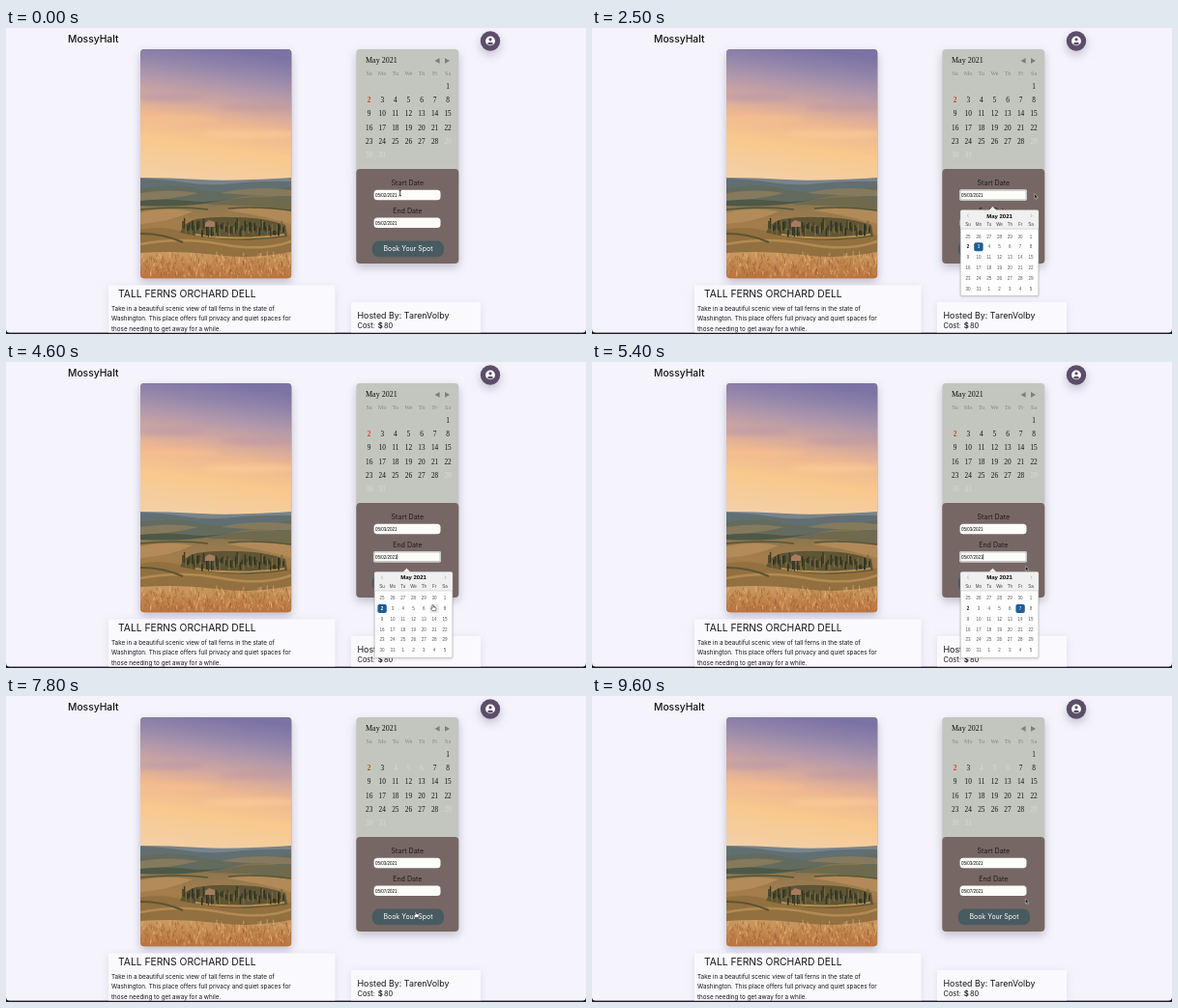
These frames come from a looping animation (600x317 px, 9700 ms). An HTML page:

```html
<!DOCTYPE html>
<html lang="en">
<head>
<meta charset="utf-8">
<title>Booking page</title>
<style>
html, body { margin: 0; width: 100%; height: 100%; overflow: hidden; background: #1c1c1e; }
svg { display: block; width: 600px; height: 317px; }
text { font-family: Inter, "Open Sans", sans-serif; white-space: pre; }
.mid { text-anchor: middle; }
.serif text { font-family: "Liberation Serif", serif; }
.sans, .sans text { font-family: "Liberation Sans", sans-serif; }
.soft { filter: drop-shadow(0 4px 5px rgba(40, 35, 60, .26)); }
.faint { filter: drop-shadow(0 2px 4px rgba(70, 65, 100, .13)); }
.haze { filter: blur(2.5px); opacity: .55; }
</style>
</head>
<body>
<svg viewBox="0 0 600 317" xmlns="http://www.w3.org/2000/svg">
  <defs>
    <linearGradient id="sky" x1=".58" y1="0" x2=".42" y2="1">
      <stop offset="0" stop-color="#7b73a4"/>
      <stop offset=".14" stop-color="#9285aa"/>
      <stop offset=".27" stop-color="#b097ab"/>
      <stop offset=".4" stop-color="#cfa6a0"/>
      <stop offset=".54" stop-color="#edb791"/>
      <stop offset=".72" stop-color="#f8c88d"/>
      <stop offset="1" stop-color="#f3d0a6"/>
    </linearGradient>
    <linearGradient id="field" x1="0" y1="0" x2="0" y2="1">
      <stop offset="0" stop-color="#7f7350"/>
      <stop offset=".45" stop-color="#a57d4c"/>
      <stop offset="1" stop-color="#94703f"/>
    </linearGradient>
    <linearGradient id="wheat" x1="0" y1="0" x2="0" y2="1">
      <stop offset="0" stop-color="#c99a62"/>
      <stop offset="1" stop-color="#b9713c"/>
    </linearGradient>
    <clipPath id="frame"><rect x="139" y="22" width="156.3" height="237.3" rx="4"/></clipPath>
  </defs>

  <rect y="-10" width="600" height="325.800" rx="4" fill="#f5f4fd"/>
  <text x="64" y="14.6" font-size="10.300" font-weight="500" fill="#111">MossyHalt</text>

  <circle class="soft" cx="501" cy="13.5" r="10.2" fill="#5c4e69"/>
  <circle cx="501" cy="13.4" r="4.9" fill="#fff"/>
  <circle cx="501" cy="11.8" r="1.6" fill="#5c4e69"/>
  <path d="M497.8 15.9q3.2-2.5 6.4 0q-3.2 3.3-6.4 0z" fill="#5c4e69"/>

  <rect class="soft" x="139" y="22" width="156.3" height="237.3" rx="4" fill="#b58b58"/>
  <g clip-path="url(#frame)">
    <rect x="139" y="22" width="157" height="140" fill="url(#sky)"/>
    <g class="haze">
      <ellipse cx="168" cy="72" rx="38" ry="4" fill="#b596aa"/>
      <ellipse cx="262" cy="82" rx="42" ry="4" fill="#bd98a0"/>
      <ellipse cx="176" cy="94" rx="46" ry="4" fill="#f8c28d"/>
      <ellipse cx="254" cy="110" rx="50" ry="4" fill="#fbd29a"/>
    </g>
    <path d="M139 155q30 0 62 2t94-2v30H139z" fill="#78838b"/>
    <path d="M139 156q22 0 46 4t50 1 60-2v35H139z" fill="#626f72"/>
    <path d="M139 166q34-6 62 1t94-3v40H139z" fill="#636b5f"/>
    <path d="M139 171q30-5 60 0-28 7-60 8zM222 171q36-8 73-3v6q-40 0-73-3z" fill="#857a5e"/>
    <path d="M139 183q22-6 46-2t50-4 60 1v60H139z" fill="url(#field)"/>
    <path d="M139 179q24-3 50 0t48-4q-38 12-98 9z" fill="#4d5847"/>
    <path d="M208 183q40-11 87-7v12q-46-5-87-5z" fill="#6f694e"/>
    <path d="M139 191q26-6 54-1-24 11-54 13z" fill="#b38b58"/>
    <path d="M228 189q34-5 67 1v13q-34-10-67-14z" fill="#b18a58"/>
    <path d="M139 188q40-4 70 0M230 187q30-3 65 2" fill="none" stroke="#555439" stroke-width="1.500"/>
    <path d="M139 209q22-5 46 3 54 8 110 2v24H139z" fill="#92703f"/>
    <path d="M139 224q42-8 84 0t72-3" fill="none" stroke="#b28b52" stroke-width="2.500"/>
    <path d="M139 213q24 0 44 9" fill="none" stroke="#5d5335" stroke-width="2"/>
    <path d="M180 212q4-11 17-14 20-3 38-2 30 0 54 8l2 12q-56 9-111-4z" fill="#5f5535"/>
    <path d="M196 214q44 7 92 0" fill="none" stroke="#b98e50" stroke-width="1.800"/>
    <g id="trees" stroke-linecap="round"/>
    <path d="M206 202l4-3 6 2v5h-10z" fill="#a67c5c"/>
    <path d="M139 233q40-3 78 2t78-3v28H139z" fill="url(#wheat)"/>
    <g id="straw" fill="none" stroke-width=".7"/>
  </g>

  <g class="soft">
    <rect x="362.300" y="22" width="106" height="222" rx="4" fill="#c3c6bf"/>
    <rect x="362.300" y="146" width="106" height="98" rx="4" fill="#766764"/>
  </g>
  <g class="serif" id="month">
    <text x="372" y="36" font-size="8" fill="#111">May 2021</text>
    <path d="M448.600 31v5.800l-5-2.900zM454 31v5.800l5-2.900z" fill="#7d7f7b"/>
  </g>

  <g class="mid" font-size="7.1" fill="#211b1b">
    <text x="415.3" y="163">Start Date</text>
    <text x="415.3" y="191.700">End Date</text>
  </g>
  <g id="inputs" class="sans"></g>
  <rect x="378.800" y="220.600" width="74.200" height="16.600" rx="7" fill="#475b60"/>
  <text class="mid" x="416" y="231.400" font-size="7" fill="#fff">Book Your Spot</text>

  <rect class="faint" x="106" y="266.500" width="234.500" height="49.300" fill="#f9f9fe"/>
  <rect class="faint" x="357" y="284" width="134" height="31.800" fill="#f9f9fe"/>
  <g fill="#161616">
    <text x="116" y="279.300" font-size="10.300">TALL FERNS ORCHARD DELL</text>
    <g font-size="6.300">
      <text x="109" y="292.500">Take in a beautiful scenic view of tall ferns in the state of</text>
      <text x="109" y="303.200">Washington. This place offers full privacy and quiet spaces for</text>
      <text x="109" y="313.900">those needing to get away for a while.</text>
    </g>
    <text x="363.500" y="300.700" font-size="8.900">Hosted By: TarenVolby</text>
    <text x="363.500" y="311" font-size="7.400">Cost:</text>
    <text x="384.800" y="311" font-size="7.800" font-weight="600">$</text>
    <text x="391" y="311" font-size="7.400">80</text>
  </g>
  <rect y="315.800" width="600" height="1.200" fill="#1c1c1e"/>

  <g id="picker" class="sans"></g>

  <g id="cursor">
    <path id="beam" d="M-1.300-3q1.300 0 1.300 1v4q0 1-1.300 1M1.300-3Q0-3 0-2M1.300 3Q0 3 0 2" fill="none" stroke="#111" stroke-width=".8"/>
    <path id="arrow" d="M0 0v5l1.200-1 .8 1.900.9-.4-.8-1.800h1.600z" fill="#111" stroke="#fff" stroke-width=".4"/>
    <path id="hand" d="M-.6.300q.6-.7 1.200 0v2l2.300.6q.7.300.5 1.200l-.5 2H-.6L-2.200 3.700q.2-.9 1.600 0z" fill="#fff" stroke="#222" stroke-width=".55"/>
  </g>
</svg>
<script>
const LOOP = 9700, STEP = 100;
const WEEK = ['Su', 'Mo', 'Tu', 'We', 'Th', 'Fr', 'Sa'];
const $ = id => document.getElementById(id);
const add = (id, markup) => $(id).insertAdjacentHTML('beforeend', markup);
const label = (x, y, size, fill, str, extra = '') =>
  `<text class="mid" x="${x}" y="${y}" font-size="${size}" fill="${fill}" ${extra}>${str}</text>`;

let seed = 11;
const rand = () => (seed = seed * 16807 % 2147483647) / 2147483647;

function drawPhoto() {
  const leaves = ['#2f3323', '#3a3d28', '#7b6a3d'];
  for (let i = 0; i < 64; i++) {
    const x = 183 + i * 1.65, y = 207 + rand() * 9;
    const h = 3 + rand() * 8;
    add('trees', `<path d="M${x} ${y}v${-h}" stroke="${leaves[i % 3]}" stroke-width="${1 + rand()}"/>`);
  }
  const tones = ['#ecc58d', '#a4602f', '#dd9d5e', '#8c562c'];
  tones.forEach(tone => {
    let d = '';
    for (let i = 0; i < 85; i++)
      d += `M${139 + rand() * 156} ${236 + rand() * 23}l${rand() * 3 - 1.5} ${-2 - rand() * 4}`;
    add('straw', `<path d="${d}" stroke="${tone}" opacity=".75"/>`);
  });
}

function drawMonth() {
  const x = col => 375.7 + col * 13.57;
  WEEK.forEach((w, i) => add('month', label(x(i), 49, 6, '#858782', w)));
  for (let day = 1; day <= 31; day++) {
    const cell = day + 5, row = Math.floor(cell / 7);
    const fill = day === 2 ? '#d0441a' : day > 28 ? '#d7d9d3' : '#111';
    add('month', label(x(cell % 7), 62.6 + row * 14.35, 7.3, fill, day,
      `id="day${day}"${day === 2 ? ' font-weight="bold"' : ''}`));
  }
}

function drawInputs() {
  [167.8, 196.6].forEach((y, i) => add('inputs',
    `<rect id="box${i}" x="380.600" y="${y}" width="68.900" height="10.500" fill="#fcfdf9"/>
     <rect id="ring${i}" x="380.900" y="${y + .3}" width="68.300" height="9.900" rx=".8" fill="none" stroke="#5b6566" stroke-width=".5"/>
     <text id="date${i}" x="382" y="${y + 7}" font-size="4.500" fill="#000"></text>
     <path id="caret${i}" d="M404.700 ${y + 2.6}v5.400" stroke="#000" stroke-width=".6"/>`));
}

const CELL = 10.8, COL0 = 389.1, ROW0 = 215.9;

function drawPicker() {
  add('picker', `<g filter="drop-shadow(0 1px 1px rgba(0,0,0,.15))">
    <rect x="381.200" y="188.600" width="80.700" height="89" rx="1.500" fill="#fff" stroke="#aeaeae" stroke-width=".6"/></g>
    <path d="M381.500 208V190q0-1.100 1.100-1.100h77.900q1.100 0 1.100 1.100v18z" fill="#f0f0f0"/>
    <path d="M381.400 208.200h80.300" stroke="#b4b4b4" stroke-width=".5"/>
    <path d="M410.500 188.900l4-4 4 4z" fill="#f0f0f0"/>
    <path d="M389.700 192.700l-1.400 1.700 1.400 1.700M453.700 192.700l1.400 1.700-1.400 1.700" fill="none" stroke="#aaa" stroke-width=".7"/>
    <rect id="hover" width="9.400" height="9" rx="2" fill="#e9e9e9"/>
    <rect id="pick" width="9.400" height="9" rx="2" fill="#205d96"/>`);
  add('picker', label(421.5, 196.7, 6, '#000', 'May 2021', 'font-weight="bold"'));
  WEEK.forEach((w, i) => add('picker', label(COL0 + i * CELL, 205.3, 4.5, '#444', w)));
  for (let cell = 0; cell < 42; cell++) {
    const n = cell - 5;
    const day = n < 1 ? n + 30 : n > 31 ? n - 31 : n;
    add('picker', label(COL0 + cell % 7 * CELL, ROW0 + Math.floor(cell / 7) * CELL + 1.6,
      4.5, '#555', day, `id="cell${cell}"${n === 2 ? ' font-weight="bold"' : ''}`));
  }
}

// Pointer path: start, end, target x, target y
const START = [407.7, 171];
const MOVES = [
  [800, 1400, 402, 226],
  [2000, 2400, 457.6, 171.700],
  [2900, 3400, 421.3, 201.5],
  [4000, 4700, 442.8, 254.5],
  [4900, 5300, 448.4, 211.5],
  [6200, 6900, 423.8, 223.3],
  [8300, 8900, 448.4, 210]
];

function pointer(t) {
  let [x, y] = START;
  for (const [from, to, tx, ty] of MOVES) {
    const p = Math.min(1, Math.max(0, (t - from) / (to - from)));
    const e = p * p * (3 - 2 * p);
    x += (tx - x) * e;
    y += (ty - y) * e;
  }
  return [x, y];
}

const show = (id, on) => $(id).setAttribute('visibility', on ? 'inherit' : 'hidden');
const inside = (x, y, l, t, r, b) => x > l && x < r && y > t && y < b;

function placeCell(id, cell) {
  $(id).setAttribute('x', COL0 + cell % 7 * CELL - 4.7);
  $(id).setAttribute('y', ROW0 + Math.floor(cell / 7) * CELL - 4.5);
}

function cellAt(x, y, dy) {
  const col = Math.round((x - COL0) / CELL), row = Math.round((y - dy - ROW0) / CELL);
  return col >= 0 && col < 7 && row >= 0 && row < 6 ? row * 7 + col : -1;
}

function render(t) {
  const focus = t >= 600 && t < 2700 ? 0 : t >= 3500 && t < 5700 ? 1 : -1;
  const days = [t < 1800 ? 2 : 3, t < 4900 ? 2 : 7];
  const [x, y] = pointer(t);

  days.forEach((day, i) => {
    const on = focus === i, box = $('box' + i);
    $('date' + i).textContent = `05/0${day}/2021`;
    box.setAttribute('rx', on ? .8 : 3.5);
    box.setAttribute('stroke', on ? '#fff' : 'none');
    show('ring' + i, on);
    show('caret' + i, on && t % 900 < 650);
  });

  const dy = focus === 1 ? 28.8 : 0;
  const over = focus < 0 ? -1 : cellAt(x, y, dy);
  show('picker', focus >= 0);
  if (focus >= 0) {
    const chosen = days[focus] + 5;
    $('picker').setAttribute('transform', `translate(0 ${dy})`);
    placeCell('pick', chosen);
    show('hover', over >= 0);
    if (over >= 0) placeCell('hover', over);
    for (let c = 0; c < 42; c++)
      $('cell' + c).setAttribute('fill', c === chosen ? '#fff' : c === 7 ? '#111' : '#555');
  } else {
    show('hover', false);
  }
  show('pick', focus >= 0);

  for (const d of [4, 5, 6]) $('day' + d).setAttribute('fill', t < 7200 ? '#111' : '#d7d9d3');

  const beam = inside(x, y, 380, 167, 450, 179) || inside(x, y, 380, 196, 450, 208) && over < 0;
  const hand = !beam && (over >= 0 || focus < 0 && inside(x, y, 379, 220, 453, 237));
  show('beam', beam);
  show('hand', hand);
  show('arrow', !beam && !hand);
  $('cursor').setAttribute('transform', `translate(${x} ${y})`);
}

drawPhoto();
drawMonth();
drawInputs();
drawPicker();

const begin = performance.now();
function tick() {
  const t = (performance.now() - begin) % LOOP;
  render(Math.floor(t / STEP) * STEP);
  requestAnimationFrame(tick);
}
tick();
</script>
</body>
</html>
```
